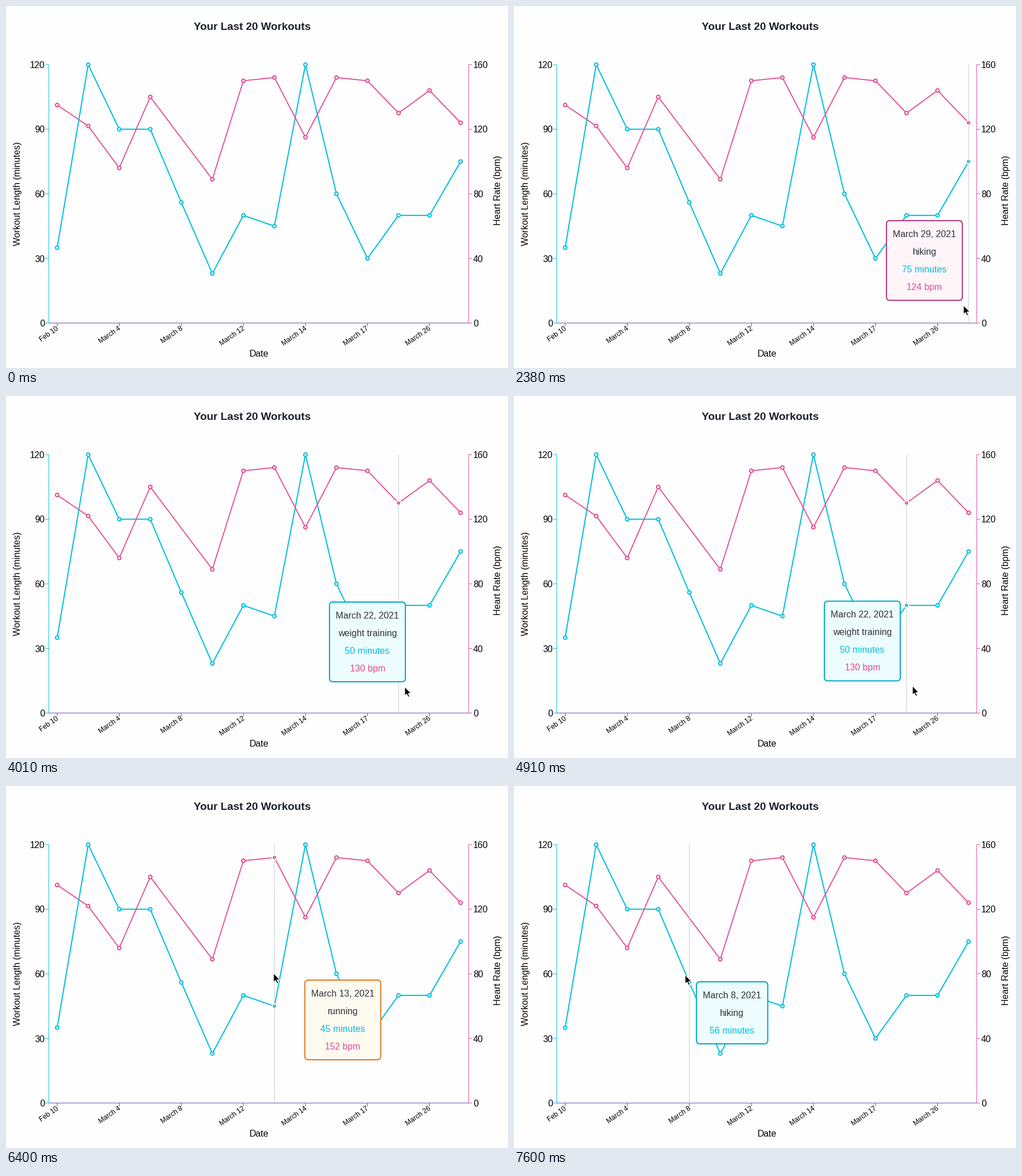
Write a matplotlib script that moves like this. It is 880x636 px and loops after 8 s.

```python
import numpy as np
import matplotlib.pyplot as plt
from matplotlib.animation import FuncAnimation
from matplotlib.patches import Circle, FancyBboxPatch, Polygon

W, H, DPI = 880, 636, 100
INTERVAL, FRAMES = 40, 200
PX = 72 / DPI

CYAN, PINK, PURPLE, GREY = "#00bfde", "#e34a93", "#6b46c1", "#cccccc"
LEFT, RIGHT, TOP, BOTTOM = 75, 811, 103, 557

MARCH = [*range(2, 13, 2), 13, 14, 15, 17, 22, 26, 29]
DATES = ["Feb 10"] + [f"March {day}" for day in MARCH]
MINUTES = [35, 120, 90, 90, 56, 23, 50, 45, 120, 60, 30, 50, 50, 75]
BPM = [135, 122, 96, 140, None, 89, 150, 152, 115, 152, 150, 130, 144, 124]
ACTIVITY = {4: "hiking", 7: "running", 13: "hiking"}

# border and fill, cycling from the latest workout backwards
THEMES = [("#b83280", "#fff5f9"), ("#6b50c0", "#faf5ff"), ("#00a9c6", "#edfdfd"),
          ("#2b6cb0", "#ebf8ff"), ("#1f7f80", "#e6fffb"), ("#2f855a", "#f0fff4"),
          ("#e07a20", "#fffaf0")]

# the pointer moves in straight lines between these: step, x, y
STOPS = np.array([
    (0, 869, 554), (8, 788, 526), (11, 774, 513), (12, 755, 510), (17, 735, 511),
    (19, 699, 511), (28.8, 698, 508), (29.15, 590, 330), (30, 582, 325),
    (32, 535, 328), (34.3, 512, 329), (35, 469, 329), (38, 381, 331), (43, 300, 332),
])
START, STEP, LAST, SUB = 1170, 148.5, 43, 40
TIP_MS = 400

xs = np.linspace(89.7, 796.9, 14)


def y_of(value, top):
    return BOTTOM - (BOTTOM - TOP) * value / top


def ease(t):
    """CSS 'ease': cubic-bezier(.25, .1, .25, 1)."""
    p = np.linspace(0, 1, 101)
    q = 1 - p
    x = 0.75 * p * q * q + 0.75 * p * p * q + p**3
    y = 0.3 * p * q * q + 3 * p * p * q + p**3
    return np.interp(t, x, y)


def tip_rows(i):
    rows = [DATES[i] + ", 2021", ACTIVITY.get(i, "weight training"), f"{MINUTES[i]} minutes"]
    return rows if BPM[i] is None else rows + [f"{BPM[i]} bpm"]


def tip_size(i):
    rows = tip_rows(i)
    return 23 + 8 * len(rows[0]), 18 + 31 * len(rows)


def tip_goal(i, my):
    """Right of the point and below the pointer, flipped where it would overflow."""
    width, height = tip_size(i)
    left, top = xs[i] + 10, my + 11
    if left + width > RIGHT:
        left = xs[i] - 10 - width
    if top + height > BOTTOM:
        top = my - 8 - height
    return np.array([left, top])


def trace():
    """Pointer, nearest point and eased tooltip corner at every step."""
    poses, last, tip = [], None, None
    for n in range(LAST * SUB + 1):
        s = n / SUB
        mx, my = (np.interp(s, STOPS[:, 0], STOPS[:, c]) for c in (1, 2))
        near = int(np.argmin(abs(xs - mx))) if mx < RIGHT else None
        if near is not None:
            goal = tip_goal(near, my)
            if near != last:
                start, began, last = goal if tip is None else tip, s, near
            tip = start + (goal - start) * ease((s - began) * STEP / TIP_MS)
        if n % SUB == 0:
            poses.append((mx, my, near, tip))
    return poses


plt.rcParams["font.family"] = "Liberation Sans"
fig = plt.figure(figsize=(W / DPI, H / DPI), dpi=DPI, facecolor="#fefefe")
ax = fig.add_axes([0, 0, 1, 1])
ax.set(xlim=(0, W), ylim=(H, 0))
ax.axis("off")


def label(x, y, text, size=16, ha="center", color="black", **kw):
    return ax.text(x, y, text, fontsize=size * PX, ha=ha, va="baseline",
                   color=color, rotation_mode="anchor", **kw)


def rule(x, y, color, z=1):
    return ax.plot(x, y, color=color, lw=PX, solid_capstyle="butt", snap=False, zorder=z)[0]


def dot(x, y, r, fill, edge, z):
    return ax.add_patch(Circle((x, y), r, fc=fill, ec=edge, lw=2 * PX, zorder=z))


def series(values, top, color, width, z):
    pts = [(x, y_of(v, top)) for x, v in zip(xs, values) if v is not None]
    ax.plot(*zip(*pts), color=color, lw=width * PX, snap=False,
            solid_joinstyle="round", zorder=z)
    for x, y in pts:
        dot(x, y, 3, "white", color, z + 0.1)


# static chart
label(431.5, 42.5, "Your Last 20 Workouts", 19, color="#1a202c", weight="bold")
label(443.5, 616, "Date")
label(25, 330, "Workout Length (minutes)", 15.9, rotation=90)
label(866.5, 324, "Heart Rate (bpm)", 15.9, rotation=90)

rule([LEFT, RIGHT], [BOTTOM] * 2, PURPLE)
rule([LEFT] * 2, [TOP, BOTTOM], CYAN)
rule([RIGHT] * 2, [TOP, BOTTOM], PINK)
for i in range(5):
    y = y_of(i, 4)
    rule([LEFT - 6, LEFT], [y, y], CYAN)
    rule([RIGHT, RIGHT + 6], [y, y], PINK)
    label(68, y + 6, str(30 * i), 15.8, "right")
    label(819, y + 6, str(40 * i), 15.8, "left")
for i in range(0, 14, 2):
    rule([xs[i]] * 2, [BOTTOM, BOTTOM + 6], PURPLE)
    label(xs[i] + 3, 568, DATES[i], 12, "right", rotation=35)

series(MINUTES, 120, CYAN, 2, 2)
series(BPM, 160, PINK, 1.8, 3)

# hover parts
dots = [dot(0, 0, 4, color, "white", 4) for color in (CYAN, PINK)]
guide = rule([0, 0], [TOP, BOTTOM], GREY, 5)
box = FancyBboxPatch((0, 0), 1, 1, boxstyle="round,pad=0,rounding_size=6", lw=2 * PX, zorder=6)
ax.add_patch(box)
lines = [label(0, 0, "", color=c, zorder=7) for c in ("#2d3340", "#2d3340", CYAN, PINK)]
ARROW = np.array([(0, 0), (0, 15.5), (3.5, 12.4), (6, 18), (8.4, 17), (6, 11.4), (11, 11.4)])
pointer = Polygon(ARROW, closed=True, fc="black", ec="white", lw=PX, zorder=9)
ax.add_patch(pointer)
hover = [*dots, guide, box, *lines]
POSES = trace()


def show_tooltip(i, left, top):
    rows = tip_rows(i)
    width, height = tip_size(i)
    border, fill = THEMES[(13 - i) % 7]
    box.set_bounds(left + 1, top + 1, width - 2, height - 2)
    box.set(edgecolor=border, facecolor=fill)
    for n, line in enumerate(lines):
        line.set_text(rows[n] if n < len(rows) else "")
        line.set_position((left + width / 2, top + 30 + 31 * n))


def update(frame):
    step = min(int((frame * INTERVAL - START) // STEP), LAST)
    mx, my, i, tip = POSES[max(step, 0)]
    pointer.set_visible(step >= 0)
    pointer.set_xy(ARROW + (mx, my))
    for part in hover:
        part.set_visible(i is not None)
    if i is not None:
        guide.set_xdata([xs[i]] * 2)
        dots[0].center = xs[i], y_of(MINUTES[i], 120)
        dots[1].center = xs[i], y_of(BPM[i] or 0, 160)
        dots[1].set_visible(BPM[i] is not None)
        show_tooltip(i, *tip)
    return [*hover, pointer]


anim = FuncAnimation(fig, update, frames=FRAMES, interval=INTERVAL, repeat=True,
                     repeat_delay=0, blit=False)
plt.show()
```
